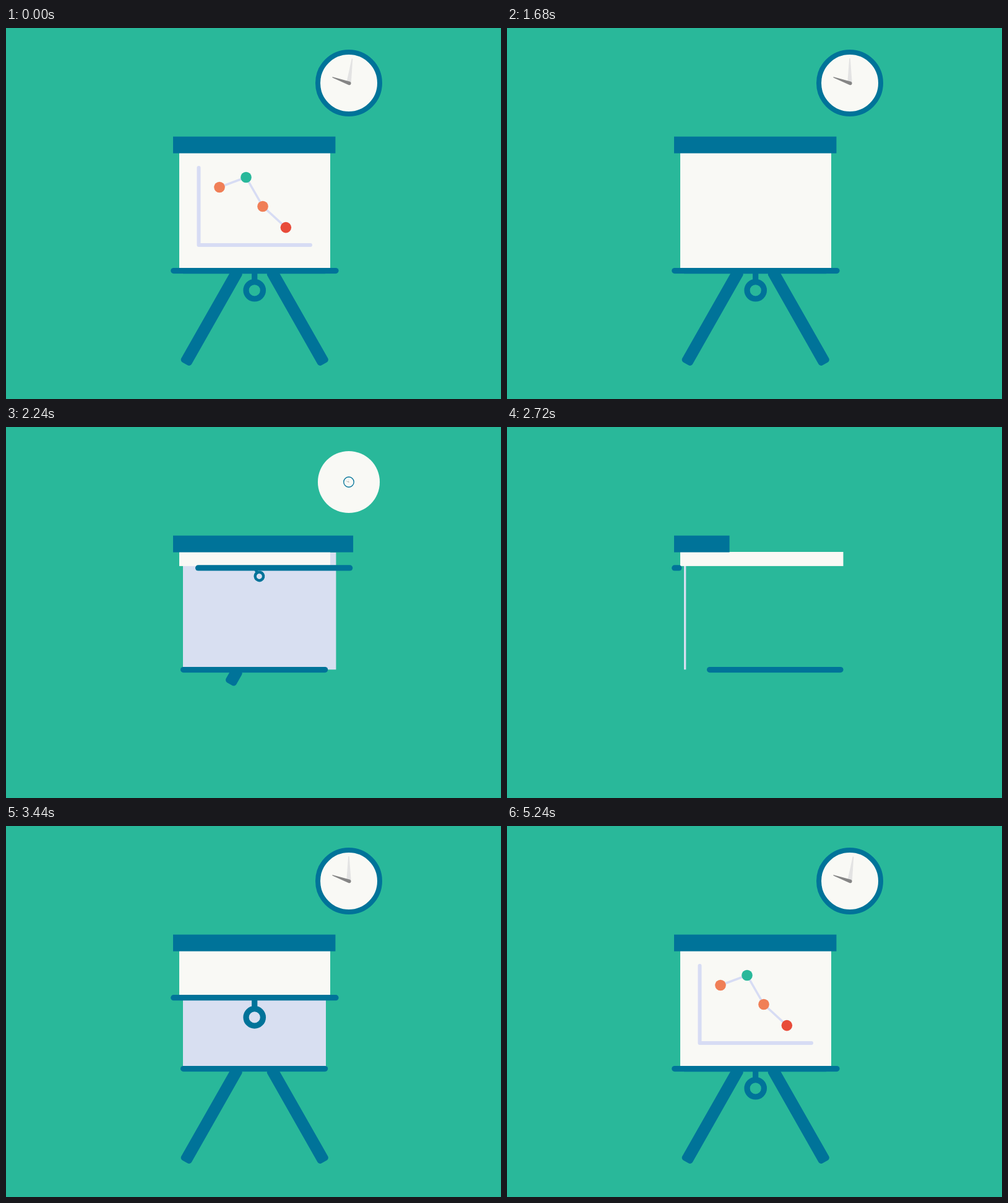
Recreate the animation shown at these times as an HTML page. Size 800x600 px, loop 5280 ms.

```html
<!DOCTYPE html>
<html lang="en">
<head>
<meta charset="utf-8">
<title>Presentation easel</title>
<style>
  html, body { margin: 0; width: 100%; height: 100%; overflow: hidden; background: #29b89a; }
  svg { display: block; width: 100vw; height: 100vh; }
  .blue { fill: #007399; }
  .bar { fill: none; stroke: #007399; stroke-width: 9.2; stroke-linecap: round; }
  .axis { fill: none; stroke: #d7dcf4; stroke-width: 6; stroke-linecap: round; stroke-linejoin: round; }
  .trend { fill: none; stroke: #d7dcf4; stroke-width: 3.5; }
</style>
</head>
<body>
<svg viewBox="0 0 800 600">
  <rect width="800" height="600" fill="#29b89a"/>

  <circle id="face" cx="554" cy="89" r="50" fill="#f9f9f5"/>
  <g id="minute"><path d="M-3.6 -2 L-.8 -39.5 Q0 -41 .8 -39.5 L3.6 -2 Q0 2 -3.6 -2Z" fill="#e3e3e3"/></g>
  <g id="clock">
    <circle r="50" fill="none" stroke="#007399" stroke-width="8"/>
    <path d="M-26.6 -10 Q-27 -9 -26 -8.6 L0 3.2 A2.9 2.9 0 0 0 2 -2.2Z" fill="#858585"/>
  </g>

  <rect id="legL" class="blue" x="-9.6" y="-6" width="19.2" rx="5"/>
  <rect id="legR" class="blue" x="-9.6" y="-6" width="19.2" rx="5"/>
  <rect id="panel" x="286" y="203" height="189.3" fill="#d8dff1"/>
  <line id="base" class="bar"/>
  <rect id="screen" x="280" y="202" fill="#f9f9f5"/>
  <rect id="header" class="blue" x="270" y="175.6" height="27"/>

  <path id="axis" class="axis" pathLength="1" d="M311.5 226V351H492"/>
  <path id="trend" class="trend" pathLength="1"/>
  <g id="dots"></g>

  <g id="pull">
    <path class="bar" d="M0 0V16"/>
    <circle class="bar" cy="31.7" r="13.7"/>
  </g>
  <line id="rail" class="bar"/>
</svg>
<script>
const LOOP = 5280, FORWARD = 2984, TURN = 2560, REWIND = 1.3;
const $ = id => document.getElementById(id);
const set = (el, attrs) => { for (const k in attrs) el.setAttribute(k, attrs[k]); };
const show = (el, on) => { el.style.display = on ? '' : 'none'; };

const progress = (u, start, length) => Math.min(1, Math.max(0, (u - start) / length));
const inOut = x => x < .5 ? 2 * x * x : 1 - 2 * (1 - x) ** 2;
const back = (x, s) => 1 + (s + 1) * (x - 1) ** 3 + s * (x - 1) ** 2;
const pop = (u, start, length, s = 1.9) => Math.max(0, back(progress(u, start, length), s));
const glide = (u, start, length) => inOut(progress(u, start, length));

const points = [
  [345, 257.5, '#f07f57'], [388, 241.5, '#29b89a'],
  [415, 288.5, '#f07f57'], [452.3, 322.6, '#e84b3a']
];
const dots = points.map(([cx, cy, fill]) => {
  const dot = document.createElementNS('http://www.w3.org/2000/svg', 'circle');
  set(dot, { cx, cy, fill });
  return $('dots').appendChild(dot);
});
$('trend').setAttribute('d', 'M' + points.map(p => p[0] + ' ' + p[1]).join('L'));

// The near end slides along once the far end overshoots.
function stretchBar(el, x, y, width, e) {
  show(el, e > 0);
  set(el, { x1: x + 1.75 * Math.max(0, e - 1) * width, x2: x + e * width, y1: y, y2: y });
}

function leg(el, x, angle, e) {
  show(el, e > 0);
  set(el, { height: 6 + 168 * e, transform: `translate(${x} 397) rotate(${angle})` });
}

function trace(el, amount) {
  show(el, amount > 0);
  set(el, { 'stroke-dasharray': `${amount} 2` });
}

function draw(time) {
  const m = (time - TURN + LOOP) % LOOP;
  const u = m < FORWARD ? m : (LOOP - m) * REWIND;

  stretchBar($('base'), 286.6, 392.6, 229, pop(u, 0, 340));
  set($('header'), { width: 262.4 * pop(u, 125, 450) });
  set($('panel'), { width: 231 * pop(u, 159, 340) });

  const railY = 227.9 + 164.7 * glide(u, 740, 360);
  set($('screen'), { width: 244 * pop(u, 14, 340), height: railY - 205 });
  stretchBar($('rail'), 270.8, railY, 262.2, pop(u, 158, 360));

  const swing = pop(u, 397, 160, 1.9);
  const hang = Math.min(swing, 1.05);
  show($('pull'), swing > 0);
  set($('pull'), { transform: `translate(401.7 ${railY}) rotate(${-58 * (1 - hang)}) scale(${hang})` });

  leg($('legL'), 372.2, 29.6, pop(u, 411, 150, 1));
  leg($('legR'), 431.3, -29.6, pop(u, 460, 150, 1));

  const ring = pop(u, 408, 327, 4);
  const tilt = -8 * (1 - glide(u, 560, 340)) + 8 * glide(u, 1900, 400);
  set($('face'), { r: 50 * pop(u, 258, 457) });
  set($('clock'), { transform: `translate(554 89) scale(${ring})` });
  set($('minute'), { transform: `translate(554 89) rotate(${tilt}) scale(${Math.min(1, ring)})` });

  trace($('axis'), glide(u, 1485, 500));
  trace($('trend'), glide(u, 2050, 450));
  dots.forEach((dot, i) => set(dot, { r: 8.8 * pop(u, 1760 + 15 * i, 300, 4) }));
}

function tick() {
  draw(Math.floor(performance.now() / 40) * 40 % LOOP);
  requestAnimationFrame(tick);
}
tick();
</script>
</body>
</html>
```
